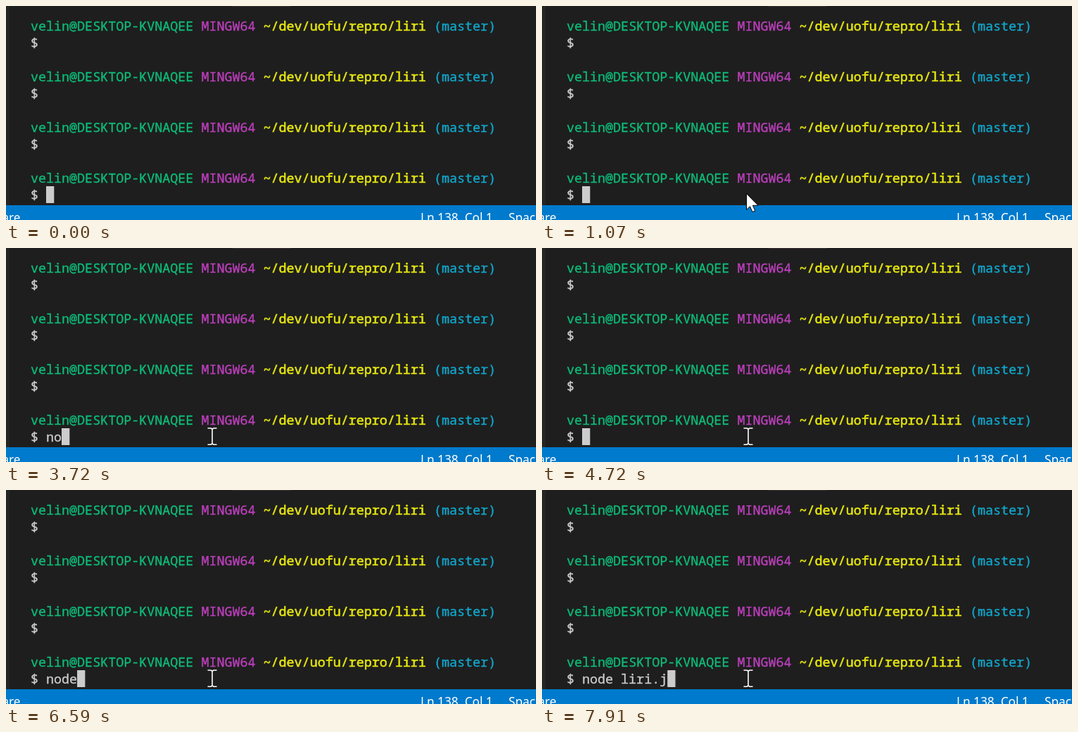
An HTML page that plays this animation: 753x304 px, repeating every 7.99 s.

```html
<!DOCTYPE html>
<html lang="en">
<head>
<meta charset="utf-8">
<title>Terminal</title>
<style>
  html, body { margin: 0; width: 100%; height: 100%; overflow: hidden; background: #1e1e1e; }
  svg { display: block; width: 753px; height: 304px; }
  text { white-space: pre; }

  .term, .caret { font: 18.367px "Noto Sans Mono", monospace; }
  .term { color: #ccc; stroke-width: .35px; }
  .term text, .term tspan, #prompt text, #prompt tspan { fill: currentColor; stroke: currentColor; }
  .user { color: #0dbc79; }
  .sys  { color: #bc3fbc; }
  .path { color: #e5e510; stroke-width: .6px; }
  .git  { color: #11a8cd; }
  .bar  { font: 17.2px "Noto Sans", sans-serif; fill: #fff; }

  .caret, .arrow, .beam { animation: 7990ms step-end infinite; }
  .caret { animation-name: type; }
  .arrow { animation-name: glide; }
  .beam  { animation-name: beam; }

  /* One character cell is .6em; the caret's cover hides untyped text. */
  @keyframes type {
    0%      { transform: translateX(0); }
    44.555% { transform: translateX(.6em); }
    46.558% { transform: translateX(1.2em); }
    57.196% { transform: translateX(.6em); }
    59.073% { transform: translateX(0); }
    78.473% { transform: translateX(.6em); }
    79.474% { transform: translateX(1.2em); }
    80.350% { transform: translateX(1.8em); }
    82.478% { transform: translateX(2.4em); }
    83.479% { transform: translateX(3em); }
    84.355% { transform: translateX(3.6em); }
    87.359% { transform: translateX(4.2em); }
    88.360% { transform: translateX(4.8em); }
    89.236% { transform: translateX(5.4em); }
    92.365% { transform: translateX(6em); }
    98.998%, 100% { transform: translateX(6.6em); }
  }

  /* The pointer enters from below and slows to rest. */
  @keyframes glide {
    0%      { transform: translate(388px, 340px); }
    5.506%  { transform: translate(388px, 298px); }
    6.492%  { transform: translate(365px, 290px); }
    7.477%  { transform: translate(345px, 284px); }
    8.463%  { transform: translate(328px, 278px); }
    9.449%  { transform: translate(314px, 274px); }
    10.434% { transform: translate(304px, 270px); }
    11.420% { transform: translate(296px, 268px); }
    12.406% { transform: translate(292px, 267px); }
    13.391% { transform: translate(290px, 266px); }
    30.162%, 100% { transform: translate(290px, 340px); }
  }

  @keyframes beam {
    0% { opacity: 0; }
    30.162%, 100% { opacity: 1; }
  }
</style>
</head>
<body>
<svg viewBox="0 0 753 304">
  <defs>
    <g id="prompt">
      <text x="35" y="35"><tspan class="user">velin@DESKTOP-KVNAQEE</tspan> <tspan class="sys">MINGW64</tspan> <tspan class="path">~/dev/uofu/repro/liri</tspan> <tspan class="git">(master)</tspan></text>
      <text x="35" y="59">$</text>
    </g>
  </defs>

  <rect width="753" height="304" fill="#1e1e1e"/>
  <rect width="5" height="283" fill="#252526"/>
  <rect x="322" width="83" height="1" fill="#3b2f31"/>

  <g class="term">
    <use href="#prompt"/>
    <use href="#prompt" y="72"/>
    <use href="#prompt" y="144"/>
    <use href="#prompt" y="216"/>
    <text x="57" y="275">node liri.j</text>
  </g>

  <g class="caret">
    <rect x="57" y="256" width="136" height="25" fill="#1e1e1e"/>
    <rect x="57" y="256" width="11.3" height="24" fill="#ccc"/>
  </g>

  <rect y="283" width="753" height="21" fill="#007acc"/>
  <g class="bar">
    <text x="20.5" y="307" text-anchor="end">are</text>
    <text x="589" y="307">Ln 138, Col 1</text>
    <text x="714" y="307">Spaces</text>
  </g>

  <path class="beam" d="M286.5 256H291L293 257.2L295 256H299.5M293 257V278.5M286.5 279.2H291L293 278L295 279.2H299.5"
        fill="none" stroke="#fff" stroke-width="1.6"/>
  <path class="arrow" d="M.5 .5V23.5L5.5 18.8L9 26.5L12.8 25L9.4 17.3H17Z"
        fill="#fff" stroke="#000"/>
</svg>
</body>
</html>
```
